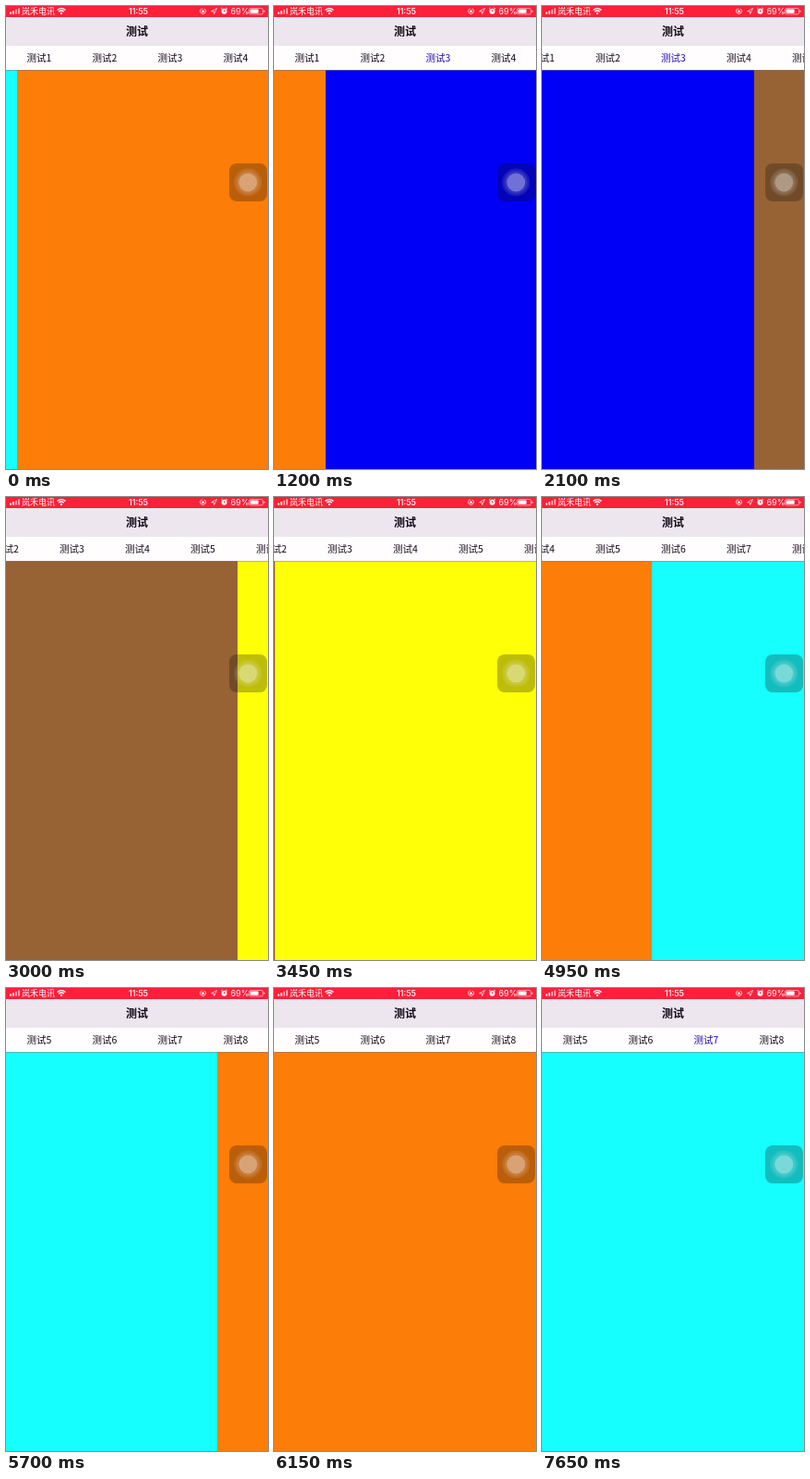
Recreate the animation shown at these times as an HTML page with a canvas. Size 284x500 px, loop 8000 ms.

```html
<!DOCTYPE html>
<html lang="zh">
<head>
<meta charset="utf-8">
<title>测试</title>
<style>
html, body { margin: 0; width: 100%; height: 100%; overflow: hidden; background: #fff; }
canvas { display: block; width: 284px; height: 500px; }
</style>
</head>
<body>
<canvas id="stage"></canvas>
<script>
const W = 284, H = 500, LOOP = 8000, STEP = 150, TAB = W / 4, TAB_TIME = 400;
const SANS = '"Noto Sans CJK SC", "Noto Sans CJK", sans-serif';
const LATIN = 'Inter, Roboto, sans-serif';
const RED = '#fc2038', WHITE = '#fff', CYAN = '#16ffff', ORANGE = '#fc7d08';
const PAGES = [CYAN, ORANGE, '#0000f6', '#976334', '#ffff08', ORANGE, CYAN, ORANGE];

// Page changes: swipes, and taps on a tab
const MOVES = [
  { start: -526, time: 600, to: 2 },
  { start: 950, time: 350, to: 3, tap: true },
  { start: 1933, time: 600, to: 4 },
  { start: 2872, time: 600, to: 5 },
  { start: 3603, time: 600, to: 6 },
  { start: 4784, time: 300, to: 7 },
  { start: 5530, time: 600, to: 8 },
  { start: 7250, time: 400, to: 7, tap: true }
];

const canvas = document.getElementById('stage');
const ctx = canvas.getContext('2d');
const dpr = window.devicePixelRatio || 1;
canvas.width = W * dpr;
canvas.height = H * dpr;

const clamp = (v, lo, hi) => Math.min(hi, Math.max(lo, v));

function ease(t, start, time) {
  const x = clamp((t - start) / time, 0, 1);
  return x * x * (3 - 2 * x);
}

// Offset that centres a tab, within the scroll range
const tabOffset = page => clamp((page - .5) * TAB - W / 2, 0, PAGES.length * TAB - W);

function stateAt(t) {
  let page = 1, tabs = 0, tapped = 0;
  for (const { start, time, to, tap } of MOVES) {
    const end = start + time;
    page += (to - page) * ease(t, start, time);
    tabs += (tabOffset(to) - tabs) * ease(t, end, TAB_TIME);
    if (tap && t >= start) tapped = to;
    else if (t >= end) tapped = 0;
  }
  return { page, tabs, tapped };
}

function rect(x, y, w, h, color) {
  ctx.fillStyle = color;
  ctx.fillRect(x, y, w, h);
}

function round(x, y, w, h, r, color) {
  ctx.fillStyle = color;
  ctx.beginPath();
  ctx.roundRect(x, y, w, h, r);
  ctx.fill();
}

function disc(x, y, r, color) {
  ctx.fillStyle = color;
  ctx.beginPath();
  ctx.arc(x, y, r, 0, Math.PI * 2);
  ctx.fill();
}

function arc(x, y, r, from, to, width) {
  ctx.lineWidth = width;
  ctx.beginPath();
  ctx.arc(x, y, r, from * Math.PI, to * Math.PI);
  ctx.stroke();
}

function line(points, width) {
  ctx.lineWidth = width;
  ctx.beginPath();
  points.forEach(([x, y]) => ctx.lineTo(x, y));
  ctx.stroke();
}

function text(str, x, y, font, color, align = 'center') {
  ctx.font = font;
  ctx.fillStyle = color;
  ctx.textAlign = align;
  ctx.fillText(str, x, y);
}

function drawStatus() {
  rect(0, 0, W, 12, RED);
  for (let i = 0; i < 4; i++) {
    const h = 2 + i * 1.4;
    rect(4 + i * 3, 8.6 - h, 2, h, i < 2 ? WHITE : 'rgba(255,255,255,.55)');
  }
  text('岚禾电讯', 17, 9, '9px ' + SANS, WHITE, 'left');
  ctx.strokeStyle = WHITE;
  arc(60, 9, 6.3, 1.25, 1.75, 1.3);
  arc(60, 9, 4, 1.25, 1.75, 1.3);
  disc(60, 7.9, 1.2, WHITE);

  text('11:55', 143.5, 9, '500 9px ' + LATIN, WHITE);

  // rotation lock, location, alarm
  arc(213.5, 5.5, 3, -.35, 1.4, .8);
  rect(212.2, 5, 2.6, 2, WHITE);
  arc(213.5, 5, .9, 1, 2, .6);
  line([[222.5, 5.8], [228.5, 2.5], [225.6, 8.6], [225.2, 5.9], [222.5, 5.8]], .7);
  disc(236.5, 5.8, 3, WHITE);
  line([[233, 3.4], [234.6, 2]], 1);
  line([[238.4, 2], [240, 3.4]], 1);
  ctx.strokeStyle = RED;
  line([[236.5, 4], [236.5, 6], [238, 6]], .7);

  text('69%', 243.5, 9, '9px ' + LATIN, WHITE, 'left');
  ctx.strokeStyle = 'rgba(255,255,255,.75)';
  ctx.lineWidth = .7;
  ctx.beginPath();
  ctx.roundRect(263.5, 2.5, 15, 6.4, 1.6);
  ctx.stroke();
  round(264.6, 3.6, 9, 4.2, .7, WHITE);
  rect(279.4, 4.7, 1, 2, WHITE);
}

function drawTabs(offset, tapped) {
  rect(0, 12, W, 31, '#ede6ee');
  text('测试', 142, 31.7, 'bold 12px ' + SANS, '#100812');
  rect(0, 43, W, 26, '#fffdfe');
  rect(0, 69, W, 1, 'rgba(130,120,122,.5)');
  PAGES.forEach((_, i) => {
    const color = i + 1 === tapped ? '#200ca8' : '#150818';
    text('测试' + (i + 1), (i + .5) * TAB - offset + .4, 60, '500 10.5px ' + SANS, color);
  });
}

function drawPages(page) {
  PAGES.forEach((color, i) => {
    const x = Math.round((i + 1 - page) * W);
    if (x > -W && x < W) rect(x, 69, W, H - 69, color);
  });
}

function drawTouchButton() {
  round(242, 170, 41, 41, 8, 'rgba(12,12,12,.27)');
  disc(262.3, 190.5, 15, 'rgba(255,255,255,.1)');
  disc(262.3, 190.5, 12.5, 'rgba(255,255,255,.1)');
  disc(262.3, 190.5, 10, 'rgba(255,255,255,.3)');
}

function frame(now) {
  const t = Math.floor((now % LOOP) / STEP) * STEP;
  const { page, tabs, tapped } = stateAt(t);
  ctx.setTransform(dpr, 0, 0, dpr, 0, 0);
  drawPages(page);
  drawTabs(tabs, tapped);
  drawStatus();
  drawTouchButton();
  requestAnimationFrame(frame);
}

frame(performance.now());
</script>
</body>
</html>
```
